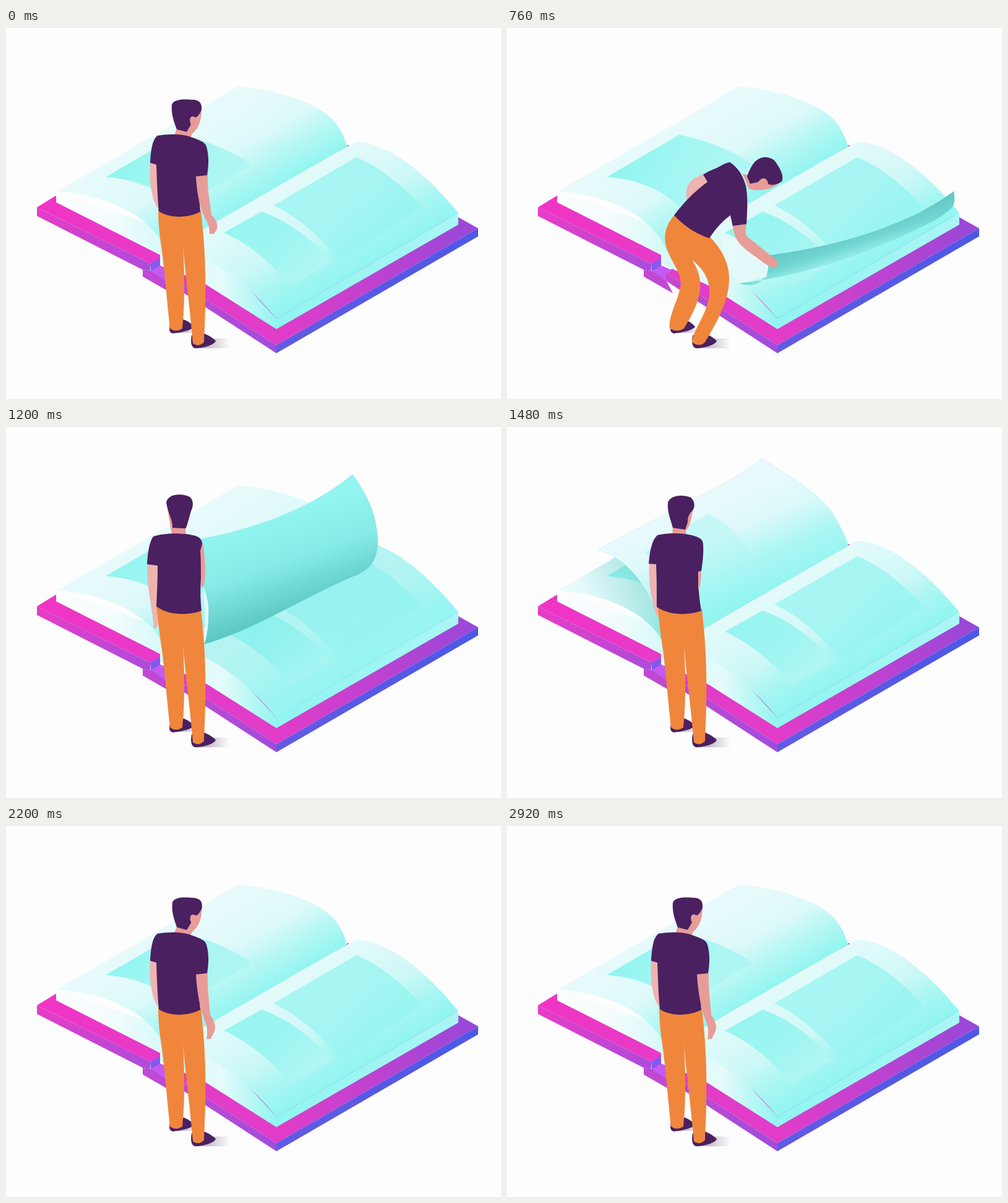
Write an HTML page with a canvas that moves like this. It is 800 px wide and 600 px high and loops after 3320 ms.

```html
<!DOCTYPE html>
<html lang="en">
<head>
<meta charset="utf-8">
<title>Turning the page</title>
<style>
html, body { margin: 0; width: 100%; height: 100%; overflow: hidden; background: #fdfdfe; }
canvas { display: block; }
</style>
</head>
<body>
<canvas id="stage" width="800" height="600"></canvas>
<script>
const ctx = document.getElementById('stage').getContext('2d');
const LOOP = 3320, STEP = 40;
const DARK = '#4a2060', SKIN = '#e79c98', PALE_SKIN = '#efb3b0', PANTS = '#f0863c';
const NUMBER = /-?[\d.]+/g;

const clamp = v => Math.max(0, Math.min(1, v));
const smooth = u => u * u * (3 - 2 * u);
const ramp = (t, from, to) => clamp((t - from) / (to - from));
const hump = (t, from, peak, to) => Math.min(ramp(t, from, peak), 1 - ramp(t, peak, to));

// Smooth spline through poses that share the same path commands.
function at(keys, t) {
  const times = Object.keys(keys).map(Number);
  const next = times.findIndex(k => k > t);
  if (next === 0) return keys[times[0]];
  if (next < 0) return keys[times[times.length - 1]];
  const poses = times.map(k => keys[k].match(NUMBER).map(Number));
  const slope = (k, j) => {
    const before = poses[k - 1], here = poses[k], after = poses[k + 1];
    if (!before || !after || before[j] === here[j] || after[j] === here[j]) return 0;
    return (after[j] - before[j]) / (times[k + 1] - times[k - 1]);
  };
  const from = next - 1, span = times[next] - times[from];
  const u = (t - times[from]) / span, s = smooth(u);
  let j = 0;
  return keys[times[from]].replace(NUMBER, () => {
    const drift = span * u * (1 - u) * ((1 - u) * slope(from, j) - u * slope(next, j));
    const value = poses[from][j] * (1 - s) + poses[next][j] * s + drift;
    j++;
    return value.toFixed(3);
  });
}

function fill(path, paint, alpha = 1) {
  ctx.globalAlpha = alpha;
  ctx.fillStyle = paint;
  ctx.fill(new Path2D(path));
  ctx.globalAlpha = 1;
}

function grad(x0, y0, x1, y1, ...stops) {
  const g = ctx.createLinearGradient(x0, y0, x1, y1);
  stops.forEach((c, i) => g.addColorStop(i / (stops.length - 1), c));
  return g;
}

// Book
const LEFT = 'M258 362 C237 295 137 265 81 265 C180 208 280 150 374 95 C425 97 500 118 528 148 C540 162 548 178 551 192 C450 250 350 307 258 362Z';
const RIGHT = 'M271 355 L551 192 L565 184 C622 184 688 246 731 299 L437 470 C395 418 330 364 271 355Z';
const LEFT_PICTURE = 'M161 241 L278 173 C320 180 370 200 397 222 L280 290 C255 265 215 245 161 241Z';

const leftPaint = grad(374, 95, 461, 245, '#e8fafb', '#e4fafa', '#dcf9f9', '#b4f7f4', '#92f5f0');
const rightPaint = grad(565, 184, 658, 343, '#e4fafa', '#daf9f9', '#ccf8f7', '#a8f6f3', '#90f5f0');
const picturePaint = grad(200, 200, 330, 270, '#94f5f0', '#a2f6f2', '#aef6f4');
const wallPaint = grad(81, 0, 437, 0, '#fcfeff', '#f4fcfd', '#d4f9f8', '#e6fbfb', '#92f5f0');

function drawCover() {
  fill('M50 290 L81 271 L249 367 L249 373 L233 381Z', grad(50, 0, 249, 0, '#f034c4', '#e83ac8'));
  fill('M50 290 L233 381 L233 393 L221 391 L50 304Z', grad(50, 0, 240, 0, '#e83cc6', '#aa4cdc'));
  fill('M257 396 L553 189 L557 193 L731 306 L763 324 L437 513Z', grad(437, 500, 763, 324, '#e23cc8', '#9848d8'));
  fill('M233 381 L249 372 L249 385 L234 394Z', '#8658ec');
  fill('M234 394 L249 384 L268 392 L257 398 L257 408Z', '#c45af2');
  fill('M221 391 L234 393 L257 408 L268 429 L221 402Z', '#c048d4');
  fill('M257 396 L437 513 L437 526 L257 409Z', grad(257, 0, 437, 0, '#c648d0', '#a04cdc'));
  fill('M437 513 L763 324 L763 337 L437 526Z', grad(437, 0, 763, 0, '#625ae4', '#4c58e6'));
}

function drawBook() {
  drawCover();
  fill('M81 265 L81 282 L249 367 L249 380 L268 390 L325 416 L437 487 L437 470 L335 360 L271 330Z', wallPaint);
  fill('M437 470 L437 487 L731 318 L731 299Z', grad(437, 0, 731, 0, '#90f5f0', '#aaf6f4'));
  fill(LEFT, leftPaint);
  fill(LEFT_PICTURE, picturePaint);
  fill(RIGHT, rightPaint);
  fill('M432 287 L566 209 C604 224 642 256 673 290 L540 378 C512 342 474 306 432 287Z',
    grad(500, 240, 595, 345, '#a8f6f3', '#a6f5f3', '#98f5f0'));
  fill('M352 331 L413 297 C456 311 498 346 528 378 L460 417 C430 381 396 351 352 331Z',
    grad(390, 310, 480, 410, '#98f5f0', '#9ef5f1', '#b0f6f4'));
}

// The sheet being turned
const SHEET = {
  540: 'M430 462 C437 468 440 468 437 468 C460 458 480 445 500 434 C501 434 501 436 500 436 C498 437 496 438 494 439 C475 450 450 462 430 462Z',
  760: 'M375 413 C405 422 422 410 421 368 C520 355 640 325 722 264 C724 276 724 286 718 292 C705 303 692 312 678 318 C580 368 470 402 375 413Z',
  920: 'M365 405 C395 385 392 350 375 300 C450 290 590 255 712 178 C722 205 724 225 715 255 C705 270 690 285 670 295 C570 340 470 380 365 405Z',
  1200: 'M318 352 C338 310 325 240 265 190 C360 175 470 150 560 77 C585 110 600 145 601 185 C600 215 590 228 570 238 C490 270 400 330 318 352Z',
  1340: 'M290 356 C305 310 290 235 200 175 C290 150 390 120 480 32 C535 70 560 105 577 165 C577 195 570 205 560 215 C470 260 380 310 290 356Z',
  1480: 'M258 362 C245 280 205 215 148 199 C200 165 340 105 413 51 C455 80 515 110 535 155 C543 170 548 180 551 192 C450 250 350 307 258 362Z',
  1800: LEFT
};
const FLAP = {
  600: 'M420 440 C425 445 430 450 434 458 C436 460 437 462 437 465 L430 462 C428 455 424 448 420 440Z',
  760: 'M345 335 C375 345 400 352 421 368 C424 380 422 392 419 403 L375 413 C360 395 348 380 345 335Z',
  1200: 'M318 256 C322 266 326 278 327 290 C328 310 326 335 321 349 L319 351 C322 330 323 300 318 256Z'
};
const SHEET_PICTURE = {
  1200: 'M330 215 L455 165 C490 200 500 230 490 255 L350 320 C355 285 350 245 330 215Z',
  1480: 'M222 203 L325 140 C355 152 380 180 395 207 L278 288 C265 255 250 225 222 203Z',
  1800: LEFT_PICTURE
};

function drawSheet(t) {
  if (t < 540 || t >= 1800) return;
  const u = ramp(t, 760, 1200);
  const shape = at(SHEET, t);
  const printed = smooth(ramp(t, 1200, 1460));
  fill(RIGHT, grad(500, 230, 600, 400, '#78eae8', '#a2f8f4'), 0.45 * hump(t, 760, 1180, 1460));
  fill(LEFT, grad(125, 270, 215, 215, '#70d0cc00', '#70d0cc'), 0.6 * hump(t, 1200, 1460, 1800));
  const line = [540 - 110 * u, 330 - 185 * u, 556 - 76 * u, 378 - 88 * u];
  fill(shape, grad(...line, '#62c8c6', '#72d6d2', '#a2f5f1'));
  fill(shape, grad(...line, '#92f5f0', '#86ebe6', '#60c8c6'), u);
  if (printed) {
    fill(shape, grad(400, 90, 470, 250, '#e8fafb', '#dcf9f9', '#aaf6f4', '#92f5f0'), printed);
    fill(at(SHEET_PICTURE, t), picturePaint, printed * (0.45 + 0.55 * ramp(t, 1480, 1800)));
  }
  if (t >= 600) fill(at(FLAP, t), grad(350, 350, 415, 400, '#e6fafa', '#e2f9f9'), 1 - ramp(t, 1200, 1300));
}

// Reader: one set of poses for each part
const LEGS_UP = 'M246 293 L315 295 C320 340 326 400 320 508 Q311 517 302 510 C297 450 291 410 286 352 C289 400 289 450 285 486 Q275 493 265 486 C260 440 257 400 252 360 C248 335 246 315 246 293Z';
const LEGS_TURNED = LEGS_UP.replace('M246 293', 'M243 288').replace('246 293Z', '243 288Z');
const LEGS = {
  0: LEGS_UP,
  440: 'M258 280 L317 316 C330 370 332 430 320 508 Q311 517 300 510 C305 450 301 400 289 366 C292 400 291 450 285 486 Q275 493 264 486 C264 440 264 410 256 370 C247 335 243 298 258 280Z',
  760: 'M270 303 L328 338 C378 390 362 440 320 508 Q311 517 299 508 C300 480 362 425 299 375 C322 410 314 440 286 486 Q275 493 263 486 C260 465 280 435 281 412 C280 380 232 350 270 303Z',
  1120: LEGS_TURNED,
  1480: LEGS_TURNED,
  1800: LEGS_UP
};

const SHIRT_UP = 'M245 174 C262 171 285 171 298 176 C312 181 322 184 324 192 C329 210 327 225 325 239 L307 241 L308 243 C310 260 313 280 314 297 C295 308 262 308 247 296 C245 275 244 250 243 221 L233 218 C234 200 236 180 245 174Z';
const SHIRT = {
  0: SHIRT_UP,
  440: 'M310 183 C318 179 328 179 335 181 C345 195 350 205 354 215 C366 235 372 255 378 278 L359 288 L346 263 C332 280 322 300 316 319 C295 316 272 303 256 283 C268 262 283 240 298 211 L287 193 C295 189 300 187 310 183Z',
  760: 'M340 226 C348 221 354 218 360 217 C372 225 380 235 386 255 C390 275 388 300 387 318 L365 321 L361 303 C348 312 337 325 327 340 C308 334 288 322 270 303 C285 283 302 265 324 249 L317 237 C325 232 332 229 340 226Z',
  1200: 'M238 177 C255 171 285 171 302 175 C314 177 317 183 317 190 C319 205 317 215 316 230 L315 240 L315 245 C314 260 314 280 316 297 C295 305 262 305 243 290 C244 270 245 250 245 224 L228 222 C229 205 231 187 238 177Z',
  1480: 'M243 175 C258 171 285 171 302 176 C313 179 317 183 317 190 C318 205 316 220 314 233 L309 234 L309 238 C309 260 311 280 314 297 C295 305 262 305 242 291 C242 270 242 250 241 222 L229 221 C231 200 234 183 243 175Z',
  1800: SHIRT_UP
};

const RIGHT_ARM = {
  0: 'M307 240 L326 238 C325 260 330 285 332 302 C342 312 343 320 340 327 L336 333 L329 333 C329 325 328 318 322 308 C312 290 308 260 307 240Z',
  440: 'M359 286 L378 277 C381 290 381 295 385 299 C405 310 425 322 444 332 L458 342 L452 351 C440 351 430 344 420 338 C388 320 366 312 359 286Z',
  600: 'M362 303 L383 297 C388 315 392 330 396 340 C410 365 420 385 428 400 L440 415 L434 424 C425 422 418 412 410 400 C392 375 372 345 362 303Z',
  760: 'M365 320 L387 317 C385 328 385 332 388 337 C400 347 415 358 426 368 L439 377 L435 387 C428 388 420 384 410 376 C392 362 366 350 365 320Z',
  960: 'M338 278 L352 266 C360 274 366 278 372 279 C380 279 386 277 390 276 L398 280 L394 288 C384 291 374 292 366 292 C354 290 345 286 338 278Z',
  1200: 'M314 200 L318 185 C320 200 322 215 322 230 C322 245 321 250 320 256 L317 259 L315 258 C315 252 315 246 315 240 C315 230 315 215 314 200Z',
  1480: 'M309 234 L314 233 C314 240 313 248 312 255 C312 258 311 260 310 262 L309 262 L309 258 C309 250 309 245 309 242 C309 240 309 237 309 234Z',
  1800: 'M307 240 L326 238 C325 260 329 290 330 305 C338 318 340 325 336 334 L331 344 L324 345 C326 335 326 325 320 312 C312 290 308 260 307 240Z'
};

const LEFT_ARM_UP = 'M233 214 L245 216 C244 235 245 250 245 260 C246 270 247 280 247 288 L247 292 L245 292 C241 285 238 278 236 268 C232 250 232 235 233 214Z';
const LEFT_ARM = {
  0: LEFT_ARM_UP,
  240: 'M258 200 L272 213 C262 222 255 230 250 237 C243 250 234 262 228 272 L224 288 L210 284 C210 272 215 262 221 250 C228 230 238 212 258 200Z',
  440: 'M288 192 L298 210 C285 213 275 214 271 220 C265 238 256 250 248 266 L250 284 L231 286 C231 270 238 262 242 245 C248 222 255 205 288 192Z',
  760: 'M318 236 L325 250 C315 258 308 264 300 272 C297 276 295 278 293 281 L292 282 L291 280 C289 272 289 265 291 258 C295 246 307 240 318 236Z',
  1200: 'M228 220 L245 222 C244 245 244 270 244 290 C245 300 246 310 246 318 L243 326 L238 325 C239 310 235 300 234 285 C229 260 228 240 228 220Z',
  1480: 'M230 219 L242 221 C241 245 242 265 242 285 C243 292 244 298 245 303 L244 307 L242 306 C239 298 237 290 235 280 C230 260 229 240 230 219Z',
  1800: LEFT_ARM_UP
};

const FACE_UP = 'M316 132 C316 148 312 162 301 171 L298 177 L272 174 L276 162 L300 140Z';
const FACE = {
  0: FACE_UP,
  440: 'M411 185 C405 195 392 207 376 210 L361 213 L343 203 L357 188 L385 185Z',
  760: 'M440 250 C432 260 415 263 398 262 L391 260 L381 236 L392 238 L418 243Z',
  1200: 'M292 140 C292 150 291 158 290 162 L291 173 L268 173 L265 156 L261 133Z',
  1480: 'M300 135 C298 150 296 160 289 168 L290 176 L267 174 L268 162 L290 140Z',
  1800: FACE_UP
};

const HAIR_UP = 'M268 124 C271 114 290 115 303 116 C313 117 317 122 316 132 C313 140 308 146 305 144 C298 140 295 148 299 156 L292 168 L276 164 C270 148 267 138 268 124Z';
const HAIR = {
  0: HAIR_UP,
  440: 'M366 163 C372 152 382 150 392 156 C404 164 415 175 411 185 C405 192 398 194 393 191 C384 185 378 190 379 199 L367 205 L356 189 C358 178 361 170 366 163Z',
  760: 'M400 217 C410 207 422 207 432 214 C440 224 449 240 444 248 C440 252 428 256 422 252 C421 242 412 240 406 249 L393 252 L388 240 C391 231 395 223 400 217Z',
  1200: 'M259 122 C262 107 285 107 297 113 C302 117 303 125 301 131 C298 138 297 143 296 147 C294 153 293 158 291 163 L290 164 L269 163 C270 150 261 138 259 122Z',
  1480: 'M260 122 C265 109 285 109 297 114 C302 118 304 126 302 131 C300 136 298 137 297 138 C293 143 292 148 292 154 L288 166 L268 163 C264 148 259 138 260 122Z',
  1800: HAIR_UP
};

const NOD = { 2180: '0', 2360: '.5', 2560: '-.2', 2740: '.25', 2920: '0' };

function drawReader(t) {
  const part = (keys, paint) => fill(at(keys, t), paint);
  fill('M275 486 H306 V493 H275Z', grad(275, 0, 306, 0, '#a49aa8', '#f0eef3'));
  fill('M305 502 H360 V518 H305Z', grad(315, 0, 360, 0, '#b4acb8', '#fafafc'));
  fill('M265 480 C263 488 264 493 270 494 C285 492 302 488 304 483 C298 476 290 472 285 471Z', DARK);
  fill('M300 497 C298 508 299 517 306 518 C322 517 337 512 339 506 C333 500 325 496 320 494Z', DARK);
  part(LEFT_ARM, PALE_SKIN);
  part(LEGS, PANTS);
  ctx.save();
  ctx.translate(285, 172);
  ctx.rotate(+at(NOD, t));
  ctx.translate(-285, -172);
  part(FACE, SKIN);
  part(HAIR, DARK);
  ctx.restore();
  part(SHIRT, DARK);
  part(RIGHT_ARM, SKIN);
}

function frame(now) {
  const t = Math.floor(now % LOOP / STEP) * STEP;
  ctx.fillStyle = '#fdfdfe';
  ctx.fillRect(0, 0, 800, 600);
  drawBook();
  drawSheet(t);
  drawReader(t);
  requestAnimationFrame(frame);
}
frame(0);
</script>
</body>
</html>
```
